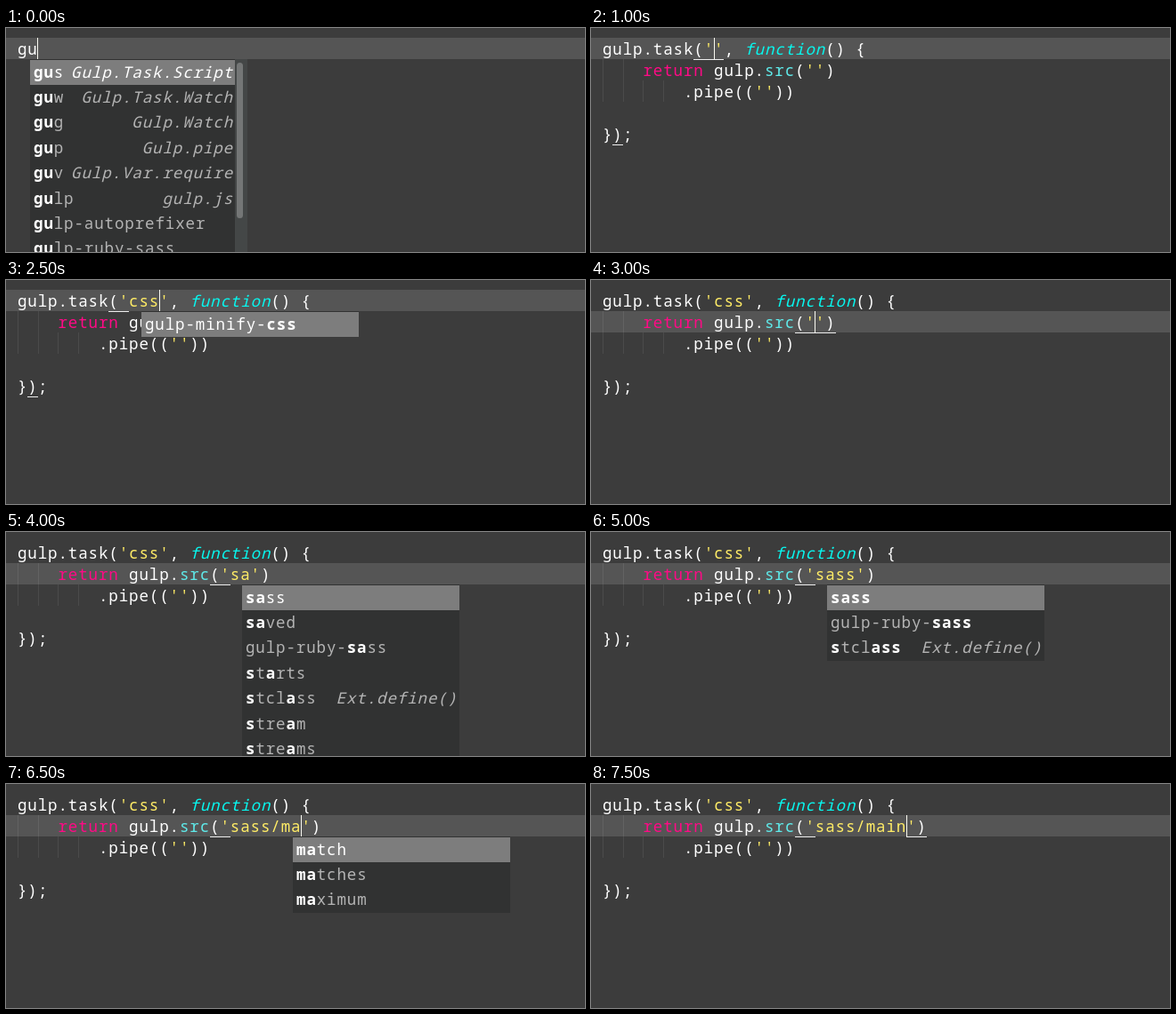
Write an HTML page that moves like this. It is 650 px wide and 252 px high and loops after 8 s.

```html
<!DOCTYPE html>
<html lang="en">
<head>
<meta charset="utf-8">
<title>Editor completion</title>
<style>
  html, body { margin: 0; width: 100%; height: 100%; overflow: hidden; background: #3c3c3c; }
  #stage {
    position: relative; width: 650px; height: 252px; overflow: hidden;
    font: 17.5px "Noto Sans Mono", "DejaVu Sans Mono", monospace;
    letter-spacing: .87px; color: #fff; white-space: pre;
  }
  #stage div { position: absolute; box-sizing: border-box; }
  .band { left: 0; width: 650px; height: 24px; background: #555; }
  .line { left: 13px; height: 24px; line-height: 24px; }
  .guide { width: 1px; height: 24px; background: #fff; opacity: .08; }
  .under { width: 11.4px; height: 1px; background: #eee; }
  .caret { width: 1px; height: 24px; background: #f8f8f0; }
  .kw { color: #ff0a86; }
  .fn { color: #08f6ee; font-style: italic; }
  .call { color: #5feaea; }
  .str { color: #ffec66; }
  .menu { width: 244px; background: #313232; overflow: hidden; }
  .row { left: 0; width: 100%; height: 28.4px; line-height: 24px; padding: 1px 2px 0 4px; color: #b4b4b4; }
  .row b { color: #fff; font-weight: 700; }
  .row i { position: absolute; right: 2px; }
  .row.on { background: #7d7d7d; color: #fff; }
  .track { right: 0; top: 0; width: 14px; height: 100%; background: #444747; }
  .thumb { left: 2px; top: 4px; width: 7px; height: 175px; border-radius: 4px; background: #747676; }
</style>
</head>
<body>
<div id="stage"></div>
<script>
const stage = document.getElementById('stage');
const LOOP = 8000, LEFT = 13, TOP = 11, CHAR = 11.37, LINE = 24, ROW = 28.4;

const snippets = ['gus|Gulp.Task.Script', 'guw|Gulp.Task.Watch', 'gug|Gulp.Watch', 'gup|Gulp.pipe',
  'guv|Gulp.Var.require', 'gulp|gulp.js', 'gulp-autoprefixer', 'gulp-ruby-sass'];
const cWords = ['core', 'changes', 'concurrency', 'can', 'gulp-minify-css'];
const sWords = ['sass', 'saved', 'gulp-ruby-sass', 'starts', 'stclass|Ext.define()', 'stream', 'streams'];
const mWords = ['mi|mi', 'minifycss', 'match', 'matches', 'maximum', 'gulp-minify-css'];

// at, active line, task name, source path, caret shown, menu: [x, query, words]
const steps = [
  [0, 0, null, '', 1, [27, 'gu', snippets]],
  [1000, 0, '', '', 1],
  [1500, 0, 'c', '', 1, [152, 'c', cWords]],
  [2000, 0, 'cs', '', 1, [152, 'cs', cWords]],
  [2500, 0, 'css', '', 1, [152, 'css', cWords]],
  [3000, 1, 'css', '', 1],
  [3500, 1, 'css', 's', 1, [265, 's', sWords]],
  [4000, 1, 'css', 'sa', 0, [265, 'sa', sWords]],
  [4500, 1, 'css', 'sas', 0, [265, 'sas', sWords]],
  [5000, 1, 'css', 'sass', 0, [265, 'sass', sWords]],
  [5500, 1, 'css', 'sass/', 1],
  [6000, 1, 'css', 'sass/m', 0, [322, 'm', mWords]],
  [6500, 1, 'css', 'sass/ma', 1, [322, 'ma', mWords]],
  [7000, 1, 'css', 'sass/mai', 1, [322, 'mai', mWords]],
  [7500, 1, 'css', 'sass/main', 1]
];

const span = (cls, text) => `<span class="${cls}">${text}</span>`;
const str = text => span('str', `'${text}'`);
const box = (cls, style, inner = '') => `<div class="${cls}" style="${style}">${inner}</div>`;
const at = (x, y) => `left:${x}px;top:${y}px`;
const colX = col => LEFT + col * CHAR;
const lineY = n => TOP + n * LINE;
const under = (n, col) => box('under', at(colX(col), lineY(n) + LINE));

// Bold the letters of the query in order; null when they do not all occur.
function mark(word, query) {
  let k = 0, out = '';
  for (const ch of word) {
    if (ch === query[k]) { out += `<b>${ch}</b>`; k++; }
    else out += ch;
  }
  return k === query.length ? out : null;
}

function menu([x, query, words], y) {
  const rows = words.map(w => {
    const [word, note] = w.split('|');
    return [mark(word, query), note];
  }).filter(r => r[0] !== null);
  const bar = words === snippets;
  const width = bar ? 'width:230px;' : '';
  const list = rows.map(([text, note], i) => box(i ? 'row' : 'row on', `${width}top:${i * ROW + .5}px`,
    text + (note ? `<i>${note}</i>` : ''))).join('');
  const scroll = bar ? box('track', '', box('thumb', '')) : '';
  return box('menu', `${at(x, y)};height:${1 + rows.length * ROW}px`, list + scroll);
}

function codeLines(name, path) {
  if (name === null) return ['gu'];
  return [
    `gulp.task(${str(name)}, ${span('fn', 'function')}() {`,
    `    ${span('kw', 'return')} gulp.${span('call', 'src')}(${str(path)})`,
    `        .pipe((${str('')}))`,
    '',
    '});'
  ];
}

function draw([, active, name, path, caret, list]) {
  const fresh = name === null;
  const start = active ? 21 : 11;
  const end = fresh ? 2 : start + (active ? path : name).length;
  let html = box('band', `top:${lineY(active)}px`);
  if (!fresh) {
    [[1, 0], [1, 2], [2, 0], [2, 2], [2, 4], [2, 6]].forEach(([n, col]) => {
      html += box('guide', at(colX(col), lineY(n)));
    });
  }
  codeLines(name, path).forEach((text, n) => {
    html += box('line', `top:${lineY(n)}px`, text);
  });
  if (!fresh) {
    html += under(active, start - 2) + under(active, start - 1) + under(active, end);
    html += active ? under(1, end + 1) : under(4, 1);
  }
  if (caret) html += box('caret', at(Math.floor(colX(end)), lineY(active)));
  if (list) html += menu(list, lineY(active + 1));
  stage.innerHTML = html;
}

let shown = null;
function tick() {
  const t = performance.now() % LOOP;
  const step = steps.findLast(s => s[0] <= t);
  if (step !== shown) draw(shown = step);
  requestAnimationFrame(tick);
}
tick();
</script>
</body>
</html>
```
